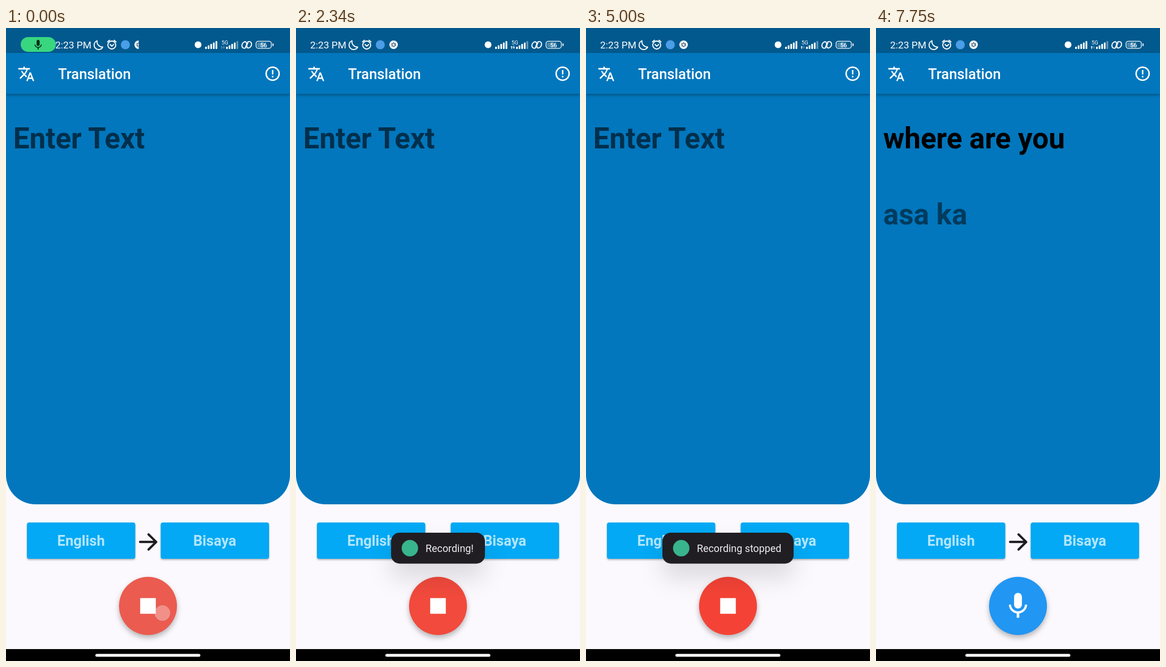
These frames come from a looping animation (502 by 1115 pixels, 8 s). An HTML page:

```html
<!DOCTYPE html>
<html lang="en">
<head>
<meta charset="utf-8">
<title>Translation</title>
<style>
html, body { margin: 0; width: 100%; height: 100%; overflow: hidden; background: #fbf9fd; }
svg { display: block; width: 100vw; height: 100vh; font-family: Roboto, sans-serif; }
.line { fill: none; stroke: #fff; stroke-width: 1.8; stroke-linecap: round; stroke-linejoin: round; }
.bar { filter: drop-shadow(0 2px 2.5px rgba(0,0,0,.35)); }
.btn rect { fill: #03a9f4; filter: drop-shadow(0 2px 1.5px rgba(0,0,0,.28)); }
.btn text { font-size: 25.55px; font-weight: 700; fill: #fff; fill-opacity: .7; text-anchor: middle; }
.big { font-size: 51.1px; font-weight: 700; }
.fab { filter: drop-shadow(0 5px 5px rgba(0,0,0,.28)); }
.toast { transform-box: fill-box; transform-origin: center; }
.toast rect { fill: #211e23; filter: drop-shadow(0 26px 20px rgba(0,0,0,.12)); }
.toast text { font-size: 17.9px; fill: #eeecef; }
</style>
</head>
<body>
<svg viewBox="0 0 502 1115">
  <defs>
    <path id="mic" d="M12 14c1.66 0 2.99-1.34 2.99-3L15 5c0-1.66-1.34-3-3-3S9 3.34 9 5v6c0 1.66 1.34 3 3 3zm5.3-3c0 3-2.54 5.1-5.3 5.1S6.7 14 6.7 11H5c0 3.41 2.72 6.23 6 6.72V21h2v-3.28c3.28-.48 6-3.3 6-6.72h-1.7z"/>
    <clipPath id="left"><rect width="234.5" height="44"/></clipPath>
  </defs>
  <rect width="502" height="1115" fill="#fbf9fd"/>
  <path d="M0 100H502V787a52 52 0 0 1-52 52H52a52 52 0 0 1-52-52z" fill="#0277bd"/>

  <!-- app bar -->
  <rect class="bar" y="-10" width="502" height="126" fill="#0277bd"/>
  <path transform="translate(20.5 65.5) scale(1.278)" fill="#fff" d="M12.87 15.07l-2.54-2.51.03-.03c1.74-1.94 2.98-4.17 3.71-6.53H17V4h-7V2H8v2H1v1.99h11.17C11.5 7.92 10.44 9.75 9 11.35 8.07 10.32 7.3 9.19 6.69 8h-2c.73 1.63 1.73 3.17 2.98 4.56l-5.09 5.02L4 19l5-5 3.11 3.11.76-2.04zM18.5 10h-2L12 22h2l1.12-3h4.75L21 22h2l-4.5-12zm-2.62 7l1.62-4.33L19.12 17h-3.24z"/>
  <text x="92" y="90" font-size="25.55" font-weight="500" fill="#fff">Translation</text>
  <circle cx="471.3" cy="80.5" r="11.5" fill="none" stroke="#fff" stroke-width="2.55"/>
  <path d="M470 74.1h2.6v7.7H470zM470 84.3h2.6v2.6H470z" fill="#fff"/>

  <!-- status bar -->
  <rect width="502" height="44" fill="#01598e"/>
  <g id="chip">
    <rect id="pill" x="26" y="16" width="62" height="26" rx="13" fill="#38d77f"/>
    <use id="chipMic" href="#mic" transform="translate(46 19) scale(.9)" fill="#082a1a"/>
  </g>
  <g clip-path="url(#left)">
    <g id="info">
      <text x="25" y="35.7" font-size="17.4" fill="#fff">2:23 PM</text>
      <path class="line" d="M99 22.5A8 8 0 1 0 109 33.5A9.5 9.5 0 0 1 99 22.5z"/>
      <circle class="line" cx="125" cy="30" r="7"/>
      <path class="line" d="M117.5 24.5l3.5-3M132.5 24.5l-3.5-3M122 29l3 3 3.5-3"/>
      <circle cx="149" cy="29.5" r="8" fill="#4a9de6"/>
      <g id="gear">
        <circle cx="172.5" cy="29.5" r="7.5" fill="#fff"/>
        <circle cx="172.5" cy="29.5" r="3" fill="none" stroke="#234a66" stroke-width="2.2" stroke-dasharray="2.2 .94"/>
      </g>
    </g>
  </g>
  <circle cx="339.5" cy="29.5" r="6" fill="#fff"/>
  <g id="bars" fill="#fff"></g>
  <text x="381" y="28.5" font-size="9.5" fill="#fff">5G</text>
  <path id="up" d="M379.5 34l1.8-2.5 1.8 2.5h-1.2v3h-1.2v-3z" fill="#fff"/>
  <path id="down" d="M383.3 34l1.8 2.7 1.8-2.7h-1.2v-3h-1.2v3z" fill="#fff"/>
  <path class="line" stroke-width="2" d="M424 34.5c-3 2.5-7 .5-7-3.5 0-5 5-8 7.500-6 2 2 0 7-1 8M427 25c3-2.500 7-.5 7 3.500 0 5-5 8-7.500 6-2-2 0-7 1-8"/>
  <rect x="444" y="25.500" width="14" height="8.500" rx="2" fill="#fff" opacity=".3"/>
  <rect x="442" y="23.300" width="27" height="12.500" rx="4" fill="none" stroke="#fff" stroke-width="1.300"/>
  <path class="line" d="M472 28v3"/>
  <text x="455.500" y="33.500" font-size="10.500" font-weight="500" fill="#fff" text-anchor="middle">56</text>

  <!-- text fields -->
  <text id="hint" class="big" x="12.8" y="212" fill-opacity=".6">Enter Text</text>
  <g id="result" class="big">
    <text x="12.8" y="212">where are you</text>
    <text x="12.8" y="346" fill-opacity=".5">asa ka</text>
  </g>

  <!-- controls -->
  <g class="btn"><rect x="37" y="871" width="191.500" height="64" rx="4"/><text x="132.700" y="912.300">English</text></g>
  <g class="btn"><rect x="273.500" y="871" width="191.500" height="64" rx="4"/><text x="369" y="912.300">Bisaya</text></g>
  <path d="M237 905.300H265M252 892l13.500 13.300L252 918.600" fill="none" stroke="#1d1b20" stroke-width="4" stroke-linecap="round" stroke-linejoin="round"/>
  <circle id="fab" class="fab" cx="251" cy="1018" r="51.200"/>
  <circle id="ripple" cx="251" cy="1018" r="51.200" fill="#c0c8c8"/>
  <rect id="stop" x="237.200" y="1004.200" width="27.600" height="27.600" fill="#fff"/>
  <use id="fabMic" href="#mic" transform="translate(223.400 990.400) scale(2.300)" fill="#fff"/>
  <circle id="touch" cx="276.500" cy="1030.500" r="13.300" fill="#fff" fill-opacity=".32" stroke="#ccc" stroke-opacity=".35"/>

  <g id="toast1" class="toast">
    <rect x="168" y="889" width="166" height="54.500" rx="15"/>
    <circle cx="201.300" cy="916.300" r="14.500" fill="#38b58c"/>
    <text x="229" y="923">Recording!</text>
  </g>
  <g id="toast2" class="toast">
    <rect x="135" y="889" width="232" height="54.500" rx="15"/>
    <circle cx="168.300" cy="916.300" r="14.500" fill="#38b58c"/>
    <text x="196" y="923">Recording stopped</text>
  </g>

  <rect y="1094" width="502" height="21"/>
  <rect x="158" y="1102.500" width="185.500" height="5" rx="2.500" fill="#fff"/>
</svg>
<script>
const LOOP = 8000, RELEASE = 90, TAP = 2000, TAP_END = 2170, DONE = 7250;
const $ = id => document.getElementById(id);
const ramp = (t, from, to) => Math.min(1, Math.max(0, (t - from) / (to - from)));
const show = (id, v) => $(id).setAttribute('opacity', +v);

// two signal meters
for (const x of [352, 389]) {
  for (let i = 0; i < 5; i++) {
    const h = 4 + i * 2.5, dim = x > 380 && i === 4;
    $('bars').innerHTML += `<rect x="${x + i * 4.6}" y="${37 - h}" width="3" height="${h}" rx="1" opacity="${dim ? .4 : 1}"/>`;
  }
}

function toast(id, t, start, end) {
  const grow = 1 - (1 - ramp(t, start, start + 333)) ** 4;
  const leave = ramp(t, end, end + 250);
  show(id, ramp(t, start, start + 183) * (1 - ramp(t, end + 130, end + 240)));
  $(id).style.transform = `scale(${.9 + .1 * grow - .1 * leave ** 2})`;
}

function draw(t) {
  // microphone chip collapses and the status icons slide left
  const k = 1 - ramp(t, 2090, 2330) ** .7;
  $('info').setAttribute('transform', `translate(${62 * k})`);
  $('pill').setAttribute('width', 62 * k);
  show('chip', ramp(k, 0, .4));
  show('chipMic', ramp(k, .4, .8));
  show('gear', t < 100 || t > 2100);
  show('up', t < 2000 ? .35 : 1);
  show('down', t < 2000 || t >= 4750 ? .35 : 1);

  const pressed = t < TAP ? 1 - ramp(t, RELEASE, RELEASE + 250)
                          : ramp(t, TAP, TAP + 80) * (1 - ramp(t, TAP_END, TAP_END + 240));
  show('ripple', .18 * pressed);
  show('touch', t < RELEASE || (t >= TAP && t < TAP_END));

  const done = t >= DONE;
  $('fab').setAttribute('fill', done ? '#2196f3' : '#f44336');
  show('stop', !done);
  show('fabMic', done);
  show('result', done);
  show('hint', 1 - ramp(t, DONE, DONE + 170));

  toast('toast1', t, 250, 2370);
  toast('toast2', t, 2850, 4990);
}

const begin = performance.now();
function frame() {
  draw((performance.now() - begin) % LOOP);
  requestAnimationFrame(frame);
}
frame();
</script>
</body>
</html>
```
